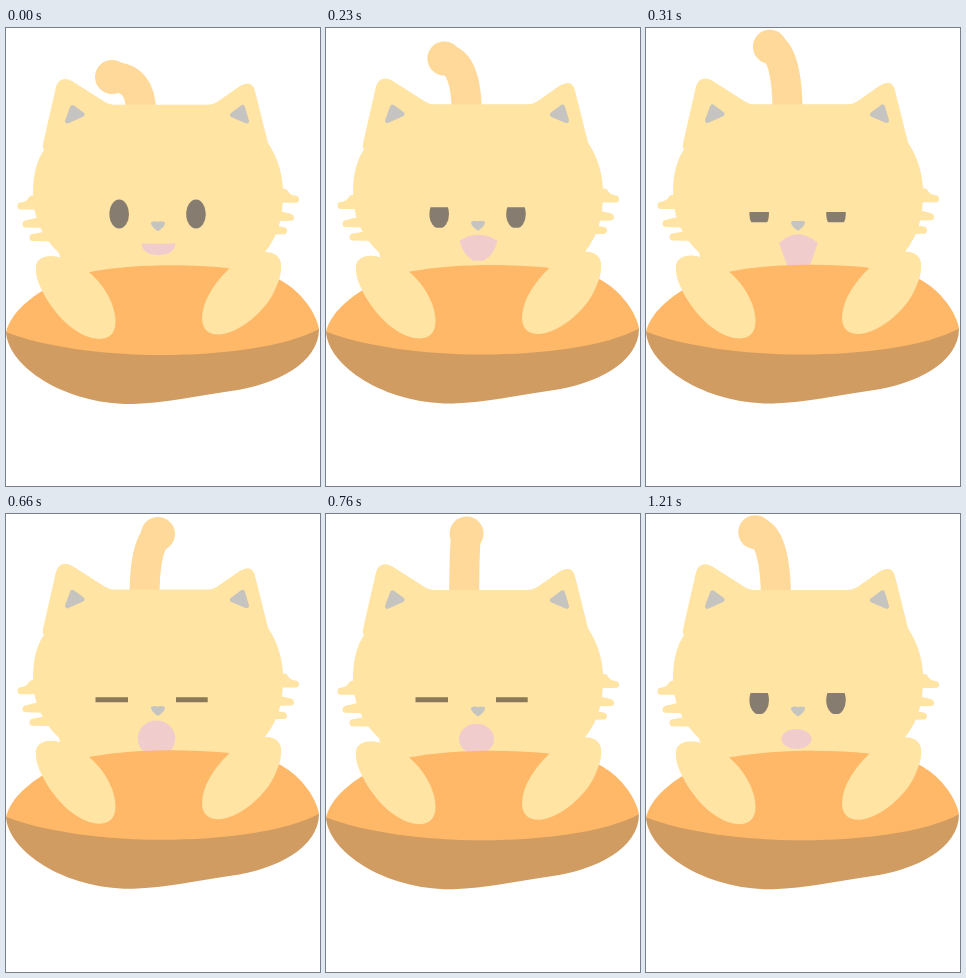
Write an HTML page that moves like this. It is 314 by 458 pixels and loops after 1410 ms.

```html
<!DOCTYPE html>
<html lang="en">
<head>
<meta charset="utf-8">
<title>Cat yawning on a cushion</title>
<style>
  html, body { margin: 0; width: 100%; height: 100%; overflow: hidden; background: #fff; }
  svg { display: block; width: 100%; height: 100%; }
  .fur { fill: #ffe4a3; }
  .whiskers { fill: #ffe4a3; stroke: #ffe4a3; stroke-width: 7; stroke-linejoin: round; }
  .tail { fill: none; stroke: #ffd999; stroke-width: 30; }
  .grey { fill: #c5c4c1; stroke: #c5c4c1; stroke-width: 5; stroke-linejoin: round; }
</style>
</head>
<body>
<svg viewBox="0 0 314 458">
  <defs><clipPath id="lids"><rect id="lidGap" x="90" width="120"/></clipPath></defs>
  <path id="tail" class="tail"/>
  <circle id="tailTip" r="17" fill="#ffd999"/>
  <g id="cat">
    <path id="whiskers" class="whiskers" d="M15 178Q23 177 26 171H38V178ZM20 196L30 193.500H40V196.500ZM27 209.500L38 207.500H50V210Z"/>
    <use href="#whiskers" transform="translate(304.500 -6.700) scale(-1 1)"/>
    <path class="fur" d="M37 116L50 59Q54 47 66 53L99 74Q103 76.700 108 76.700H202Q207 76.700 211 74L234 58Q246 51 249 63L262 115
      Q277 138 277 165C277 190 272 208 259 224L245 250H60L53 225C35 208 27 188 27 165Q27 138 38 122Q36 119 37 116Z"/>
    <path class="grey" d="M61.500 93L66.500 79.500L76 86.500ZM226.500 87L236.500 79.500L240.500 93Z"/>
    <path class="grey" style="stroke-width:3" d="M146.500 195.200Q149.500 194.200 152 195.500Q154.500 194.200 157.500 195.200Q157 198 152 201.500Q147 198 146.500 195.200Z"/>
    <path id="mouth" fill="#f1cccc"/>
    <path fill="#d09c62" d="M0 304C2 339 60 377 127 376C160 375 190 368 225 363C270 357 313 335 313 301L157 310Z"/>
    <path fill="#ffb868" d="M0 304C4 288 19 273 38 262L84 244C128 236 180 236 221 240L272 251
      C291 260 309 281 313 301C280 319 215 327 157 327C98 327 38 319 0 304Z"/>
    <path class="fur" d="M30 242C28 228 45 225 58 231C83 238 99 258 106 276C113 296 110 311 93 311C72 310 52 290 40 270C33 257 30 250 30 242Z"/>
    <path class="fur" d="M275 240C277 225 262 221 248 226C227 232 207 255 199 275C193 293 196 306 212 306.500C232 306 257 285 267 266C273 254 275 247 275 240Z"/>
  </g>
  <g id="openEyes" fill="#877c70" clip-path="url(#lids)">
    <ellipse cx="113.200" cy="186" rx="9.800" ry="14.500"/>
    <ellipse cx="190" cy="186" rx="9.800" ry="14.500"/>
  </g>
  <path id="shutEyes" stroke="#8a7957" stroke-width="5" d="M89.500 185.700H122M170 185.700H201.700"/>
</svg>
<script>
const LOOP = 1410, PEAK = 660, BLINK = 310;
const poseTimes = [0, 150, 230, BLINK, 460, PEAK, 760, 960, 1210];

const set = (id, attributes) => {
  const element = document.getElementById(id);
  for (const [name, value] of Object.entries(attributes)) element.setAttribute(name, value);
};

// The tail swings right until the peak and then back, staying raised.
function drawTail(time, rising) {
  const rise = time / PEAK, fall = (time - PEAK) / (LOOP - PEAK);
  const sway = rising ? rise ** 1.25 : (1 - fall) ** 2;
  const base = rising ? 135 + 23 * rise - 19.5 * rise ** 2 : 138.5 - 16 * fall ** 2;
  const x = 106 + 46 * sway;
  const y = 18 + 2 * sway + 31 * Math.max(0, 1 - time / BLINK) ** 0.7;
  const bendX = x + 0.7 * (base - x);
  set('tail', { d: `M${base} 84C${base} ${41 + 0.43 * y} ${bendX} ${y + 10 * sway} ${x} ${y}` });
  set('tailTip', { cx: x, cy: y });
}

function drawEyes(time, rising) {
  const closed = rising ? (time / BLINK) ** 1.4 : (LOOP - time) / BLINK;
  const shut = closed > 1;
  const top = 170 + 14 * closed, bottom = 202 - 7.7 * closed ** 3;
  set('openEyes', { visibility: shut ? 'hidden' : 'visible' });
  set('shutEyes', { visibility: shut ? 'visible' : 'hidden' });
  if (!shut) set('lidGap', { y: top, height: bottom - top });
}

// A smile that drops open behind the cushion.
function openingMouth(time) {
  const open = Math.min(1, time / BLINK);
  const droop = Math.max(0, 2 * open - 1);
  const width = 17 + 2.3 * Math.sqrt(open), corner = 215.5 - 3 * Math.sin(Math.PI * open);
  const top = 216 - 18 * open ** 0.6, bottom = 227 + 13 * droop, flat = 10.5 * droop;
  return `M${152.5 - width} ${corner}Q152 ${top} ${152.5 + width} ${corner}
    Q168 227 ${152.5 + flat} ${bottom}H${152.5 - flat}Q137 227 ${152.5 - width} ${corner}Z`;
}

// A round yawn that shrinks to a small oval.
function closingMouth(time) {
  const size = Math.max(0, 1 - (time - PEAK) / 300);
  const rx = 15 + 3.7 * size, ry = 10 + 8 * size;
  return `M${150.5 - rx} 225.700a${rx} ${ry} 0 1 1 ${2 * rx} 0a${rx} ${ry} 0 1 1 ${-2 * rx} 0Z`;
}

function draw(time) {
  const rising = time <= PEAK;
  const lift = rising ? 1.2 * time / PEAK : 0.7;
  drawTail(time, rising);
  drawEyes(time, rising);
  set('mouth', { d: time < PEAK ? openingMouth(time) : closingMouth(time) });
  set('cat', { transform: `translate(0 ${-lift})` });
}

const start = performance.now();
function frame() {
  const time = (performance.now() - start) % LOOP;
  draw(poseTimes.findLast(poseTime => poseTime <= time));
  requestAnimationFrame(frame);
}
frame();
</script>
</body>
</html>
```
